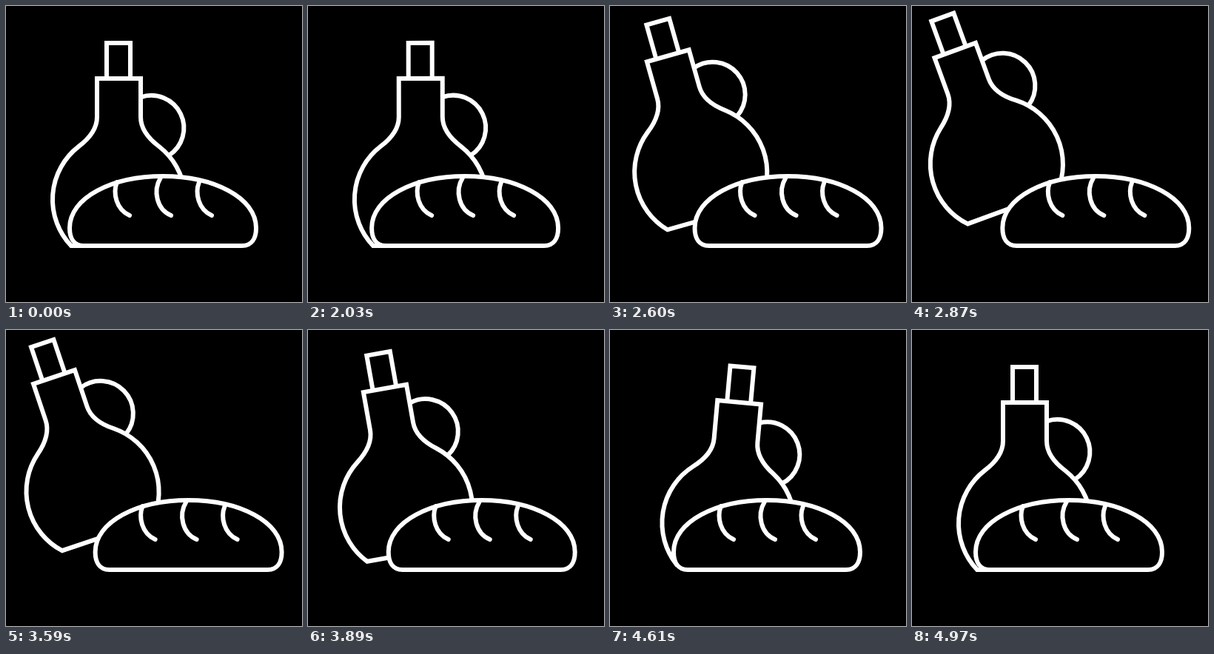
Recreate the animation shown at these times as an HTML page. Size 400 by 400 pixels, loop 5 s.

```html
<!DOCTYPE html>
<html lang="en">
<head>
<meta charset="utf-8">
<title>Bottle and bread</title>
<style>
html, body { margin: 0; width: 100%; height: 100%; overflow: hidden; background: #000; }
svg { display: block; width: 100%; height: 100%; }
</style>
</head>
<body>
<svg viewBox="0 0 400 400" fill="#000" stroke="#fff" stroke-width="6">
  <g id="bottle">
    <path d="M136 98V50H168V98"/>
    <path d="M182 123.3A44 44 0 0 1 220 202"/>
    <path d="M123 98V150C123 165 114 178 98 190A90.5 90.5 0 0 0 88 324H217A90.5 90.5 0 0 0 207 190C191 178 182 165 182 150V98Z"/>
  </g>
  <!-- Table: hides the tipped base -->
  <rect y="327" width="400" height="73" stroke="none"/>
  <g id="bread" stroke-linecap="round">
    <path d="M105 324C92 324 86 314 86 300C86 259 143 230 212 230S338 259 338 300C338 314 332 324 319 324Z"/>
    <path fill="none" d="M150 238C144 253 149 275 167 283M209 232C198 250 204 275 223 283M261 238C255 253 260 275 278 283"/>
  </g>
</svg>
<script>
const LOOP = 5000, START = 2000, LEAVE = 3270, BACK = 4385, SWING = 1100, SETTLE = 585;
const bottle = document.getElementById('bottle');
const bread = document.getElementById('bread');

// Cubic easing with flat ends and control points (a, 0) and (b, 1)
function ease(x, a, b) {
  if (x <= 0) return 0;
  if (x >= 1) return 1;
  let lo = 0, hi = 1, s;
  for (let i = 0; i < 24; i++) {
    s = (lo + hi) / 2;
    const r = 1 - s;
    if (3 * a * s * r * r + 3 * b * s * s * r + s ** 3 < x) lo = s; else hi = s;
  }
  return s * s * (3 - 2 * s);
}

function draw(now) {
  const t = now % LOOP;
  const leaving = t < LEAVE;
  const apart = ease(leaving ? (t - START) / SWING : (BACK - t) / (BACK - LEAVE), 0.31, 0.39);
  // The returning bottle tips over to the right, then settles
  const tip = leaving ? 0 : t < BACK ? 1 - apart : 1 - ease((t - BACK) / SETTLE, 0.6, 0.75);
  const x = -66.5 * apart + 17 * tip;
  const y = -44.5 * (leaving ? apart : apart ** 1.6) - tip;
  const angle = -21 * apart + 6.2 * tip;
  bottle.setAttribute('transform', `translate(${x} ${y}) rotate(${angle} 150 187)`);
  bread.setAttribute('transform', `translate(${38 * apart} 0)`);
  requestAnimationFrame(() => draw(performance.now() - begin));
}

const begin = performance.now();
draw(0);
</script>
</body>
</html>
```
